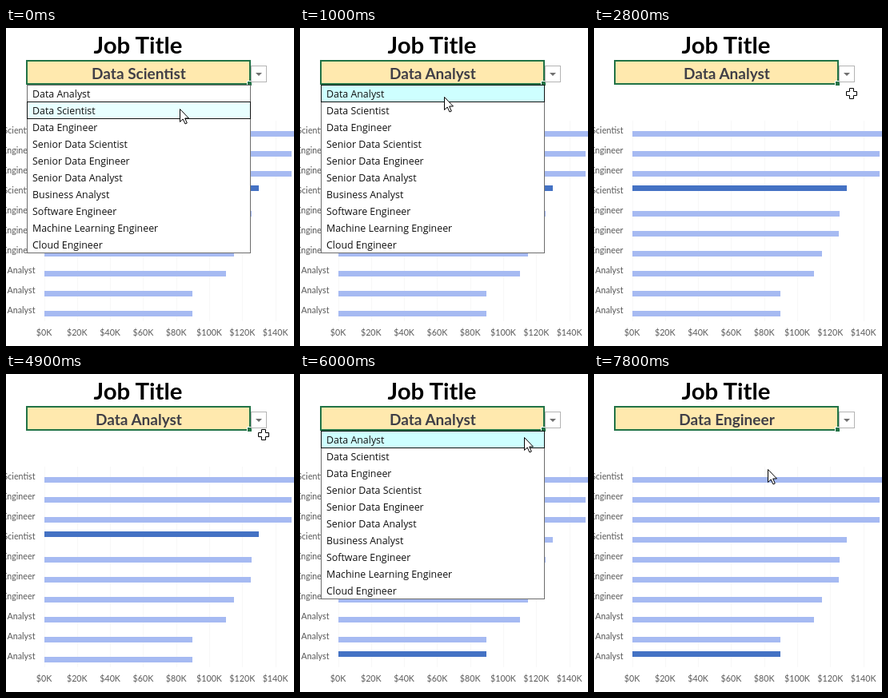
These frames come from a looping animation (360x398 px, 8000 ms). An HTML page:

```html
<!DOCTYPE html>
<html lang="en">
<head>
<meta charset="utf-8">
<title>Job title dropdown</title>
<style>
  html, body { margin: 0; width: 100%; height: 100%; overflow: hidden; background: #fff; }
  svg { display: block; }
  text { font-family: Lato, Carlito, sans-serif; }
  .title { font-size: 29.4px; font-weight: 700; text-anchor: middle; }
  .value { font-size: 19px; font-weight: 700; text-anchor: middle; fill: #403f47; }
  .axis { font-size: 10.7px; fill: #595959; }
  .list text { font: 12.4px "Open Sans", "Noto Sans", sans-serif; fill: #111; }
  .cursor path { fill: #fff; stroke: #000; stroke-width: 1; stroke-linejoin: round; }
</style>
</head>
<body>
<svg id="stage" width="360" height="398" viewBox="0 0 360 398">
  <g id="chart"></g>
  <text class="title" x="165" y="32">Job Title</text>
  <rect x="26" y="41" width="279" height="29" fill="#ffe9ae" stroke="#217346" stroke-width="2"/>
  <rect x="301.5" y="66.5" width="6" height="6" fill="#217346" stroke="#fff"/>
  <text class="value" id="value" x="166" y="64"></text>
  <rect x="306.5" y="47.5" width="19" height="20" fill="#fff" stroke="#b4b4b4"/>
  <path d="M312 56h8l-4 4z" fill="#707070"/>
  <g id="list" class="list">
    <rect x="26.5" y="71.5" width="279" height="210" fill="#fff" stroke="#6d6d6d"/>
    <rect id="hover" x="26.5" width="279" height="21" stroke="#111"/>
  </g>
  <g id="cursor" class="cursor">
    <path id="arrow" d="M.5 .5V16.5L4.2 13L7 19L9.3 18L6.7 12H11.5Z"/>
    <path id="cross" d="M-2.5-6.5H2.5V-2.5H6.5V2.5H2.5V6.5H-2.5V2.5H-6.5V-2.5H-2.5Z"/>
    <path id="hand" d="M-1.5 13V1.5Q0-.5 1.5 1.5V7Q3.5 5.5 5 7.5Q7 6.5 8.5 8.5Q11 8 11.5 10V15Q11 18 9.5 21H1Q0 18-4 13.5Q-5.5 11-3.5 11Q-2.5 11-1.5 13ZM1.5 7V11M5 7.5V11M8.5 8.5V11.5"/>
  </g>
</svg>
<script>
const $ = id => document.getElementById(id);

function add(parent, tag, attrs, text = '') {
  const el = document.createElementNS('http://www.w3.org/2000/svg', tag);
  for (const key in attrs) el.setAttribute(key, attrs[key]);
  el.textContent = text;
  return parent.appendChild(el);
}

const jobs = ['Data Analyst', 'Data Scientist', 'Data Engineer', 'Senior Data Scientist',
  'Senior Data Engineer', 'Senior Data Analyst', 'Business Analyst', 'Software Engineer',
  'Machine Learning Engineer', 'Cloud Engineer'];
jobs.forEach((job, i) => add($('list'), 'text', { x: 33, y: 87 + 21 * i }, job));

for (let i = 0; i < 8; i++) {
  const x = 47.5 + 41.3 * i;
  add($('chart'), 'path', { d: `M${Math.round(x) + .5} 116V367`, stroke: '#f7f7f7' });
  add($('chart'), 'text', { class: 'axis', x, y: 385, 'text-anchor': 'middle' }, `$${20 * i}K`);
}

const kinds = [...'SEESEEEAAA'];
const words = { S: 'Scientist', E: 'Engineer', A: 'Analyst' };
const ends = [370, 357, 357, 316, 307, 306, 285, 275, 233, 233];
const bars = ends.map((end, i) => {
  add($('chart'), 'text', { class: 'axis', x: 36.5, y: 132 + 25 * i, 'text-anchor': 'end' }, words[kinds[i]]);
  return add($('chart'), 'rect', { x: 48, width: end - 48, height: 7 });
});

// Pointer track: time, x, y
const track = [[0, 217, 101], [900, 180, 86], [1900, 180, 86], [2000, 182, 90], [2100, 182, 90],
  [2800, 322, 82], [4800, 322, 82], [4900, 322, 76], [5200, 322, 76], [5300, 319, 70],
  [5600, 319, 58], [5800, 319, 58], [6200, 240, 100], [6300, 240, 100], [6600, 216, 119],
  [7700, 216, 119], [7800, 217, 119], [8000, 217, 119]];

function pointer(t) {
  const n = track.findIndex(p => p[0] > t);
  const [t0, x0, y0] = track[n - 1], [t1, x1, y1] = track[n];
  const k = (t - t0) / (t1 - t0);
  return [Math.round(x0 + (x1 - x0) * k), Math.round(y0 + (y1 - y0) * k)];
}

const show = (id, on) => $(id).setAttribute('display', on ? 'inline' : 'none');

function draw(now) {
  const t = Math.floor(now % 8000 / 100) * 100;
  const [x, y] = pointer(t);

  $('value').textContent = jobs[t < 1000 ? 1 : t < 7000 ? 0 : 2];
  show('list', t < 1900 || t >= 5800 && t < 7800);
  $('hover').setAttribute('y', 71.5 + 21 * Math.max(0, Math.floor((y - 72) / 21)));
  $('hover').setAttribute('fill', t < 100 ? '#e8ffff' : '#ceffff');

  const active = t < 5000 ? 3 : 9;
  bars.forEach((bar, i) => {
    bar.setAttribute('y', 129 + 25 * i - (i === active ? 7 : 0));
    bar.setAttribute('fill', i === active ? '#4472c4' : '#a6baf2');
  });

  const cross = t >= 2000 && t < 5300;
  const hand = t >= 5300 && t < 5900;
  show('cross', cross);
  show('hand', hand);
  show('arrow', !cross && !hand);
  $('cursor').setAttribute('transform', `translate(${x} ${y})`);
}

const start = performance.now();
function loop() {
  draw(performance.now() - start);
  requestAnimationFrame(loop);
}
loop();
</script>
</body>
</html>
```
